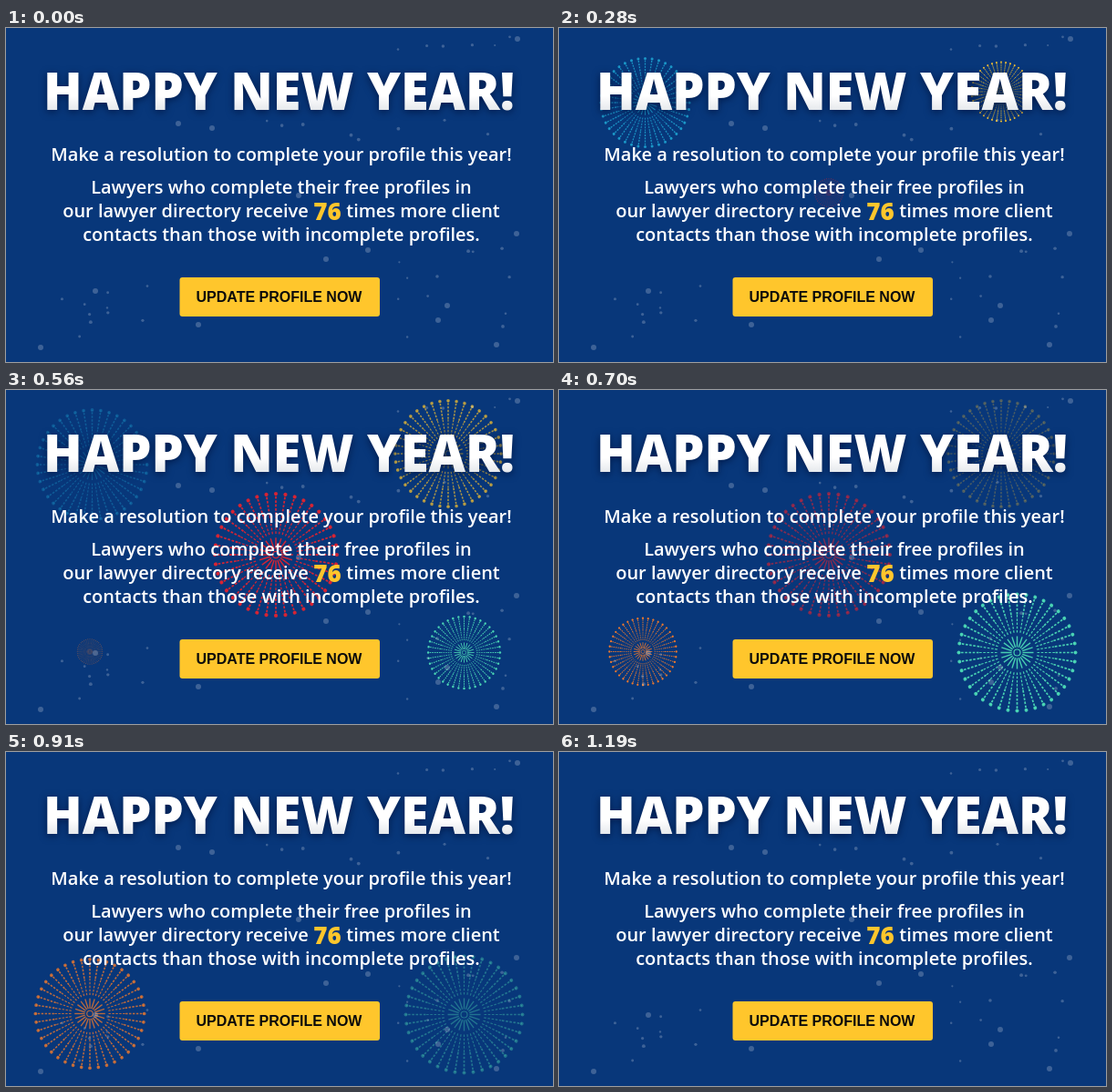
An HTML page with a canvas for the animation above (1.26 s loop, 600 by 367 pixels).

```html
<!DOCTYPE html>
<html lang="en">
<head>
<meta charset="utf-8">
<style>
  html, body { margin: 0; width: 100%; height: 100%; overflow: hidden; background: #08377a; }
  canvas, svg { position: absolute; left: 0; top: 0; }
  text { font: 600 20px "Open Sans", sans-serif; fill: #fff; text-anchor: middle; }
  .title { font-size: 55.8px; font-weight: 800; fill: url(#shine); filter: drop-shadow(0 2px 4px #001a4a); }
  .count { font-size: 26px; font-weight: 800; fill: #ffc62c; }
  .label { font: bold 16px "Liberation Sans", Arial, sans-serif; fill: #0b0b0b; }
</style>
</head>
<body>
<canvas width="600" height="367"></canvas>
<svg width="600" height="367">
  <linearGradient id="shine" x1="0" y1="50" x2="0" y2="91" gradientUnits="userSpaceOnUse">
    <stop offset=".6" stop-color="#fff"/>
    <stop offset="1" stop-color="#e4e7eb"/>
  </linearGradient>
  <text class="title" x="299.5" y="90">HAPPY NEW YEAR!</text>
  <text x="302" y="146">Make a resolution to complete your profile this year!</text>
  <text x="302" y="182">Lawyers who complete their free profiles in</text>
  <text x="197" y="208">our lawyer directory receive</text>
  <text class="count" x="352.5" y="211">76</text>
  <text x="457.5" y="208">times more client</text>
  <text x="302" y="234">contacts than those with incomplete profiles.</text>
  <rect x="190.5" y="274" width="219.5" height="43" rx="3" fill="#ffc62c"/>
  <text class="label" x="299.5" y="301">UPDATE PROFILE NOW</text>
</svg>
<script>
const ctx = document.querySelector('canvas').getContext('2d');
const STEP = 70, LOOP = 1260, RAYS = 40, TAU = 2 * Math.PI;

let seed = 7;
const random = () => (seed = seed * 16807 % 2147483647) / 2147483647;

// A few large stars, then small ones scattered in horizontal bands
const stars = [
  [189, 105], [226, 110], [561, 12], [321, 184], [98, 289], [38, 351], [211, 326],
  [351, 254], [397, 244], [484, 305], [474, 321], [538, 348], [560, 226]
].map(([x, y]) => [x, y, 3]);

function scatter(count, left, top, right, bottom) {
  while (count--) stars.push([
    left + random() * (right - left), top + random() * (bottom - top), 1 + random()
  ]);
}
scatter(6, 430, 5, 580, 25);
scatter(8, 150, 98, 560, 125);
scatter(10, 55, 280, 165, 345);
scatter(12, 430, 230, 560, 340);

// start is counted in steps
const bursts = [
  { x: 94.5, y: 82, size: 62, start: 0, color: '#1fa9d6', peak: .8 },
  { x: 485, y: 70, size: 60, start: 1.3, color: '#ffc62c', peak: 1 },
  { x: 296, y: 181, size: 69, start: 3, color: '#e8222e', peak: .9 },
  { x: 502.5, y: 288.5, size: 66, start: 5, color: '#4fe0b8', peak: .9 },
  { x: 92, y: 287.5, size: 61.5, start: 7, color: '#f47a2a', peak: .95 }
];

function dot(x, y, r) {
  ctx.beginPath();
  ctx.arc(x, y, r, 0, TAU);
  ctx.fill();
}

function ray(from, to, width, dash) {
  ctx.lineWidth = width;
  ctx.setLineDash(dash);
  ctx.beginPath();
  ctx.moveTo(0, -from);
  ctx.lineTo(0, -to);
  ctx.stroke();
}

function drawBurst({ x, y, size, start, color, peak }, step) {
  const age = step - start;
  if (age <= 0 || age >= 10) return;
  const scale = Math.min(1, .04 + .192 * age) * size / 66;
  ctx.save();
  ctx.translate(x, y);
  ctx.scale(scale, scale);
  ctx.globalAlpha = peak * Math.min(1, .4 + .2 * age, (10 - age) / 5);
  ctx.fillStyle = ctx.strokeStyle = color;
  for (let i = 0; i < RAYS; i++) {
    ctx.rotate(TAU / RAYS);
    if (i % 2) ray(6, 18, 1.4, []);
    ray(22, 42, 1.2, [2.6, 1.6]);
    ray(42, 64, 1.7, [2.6, 1.6]);
    dot(0, -64, 2);
  }
  ctx.setLineDash([]);
  ctx.lineWidth = 1.2;
  ctx.beginPath();
  ctx.arc(0, 0, 3.5, 0, TAU);
  ctx.stroke();
  ctx.restore();
}

function draw() {
  const step = Math.floor(performance.now() % LOOP / STEP);
  ctx.fillStyle = '#08377a';
  ctx.fillRect(0, 0, 600, 367);
  bursts.forEach(b => drawBurst(b, step));
  ctx.fillStyle = '#ffffff38';
  stars.forEach(s => dot(...s));
  requestAnimationFrame(draw);
}
draw();
</script>
</body>
</html>
```
